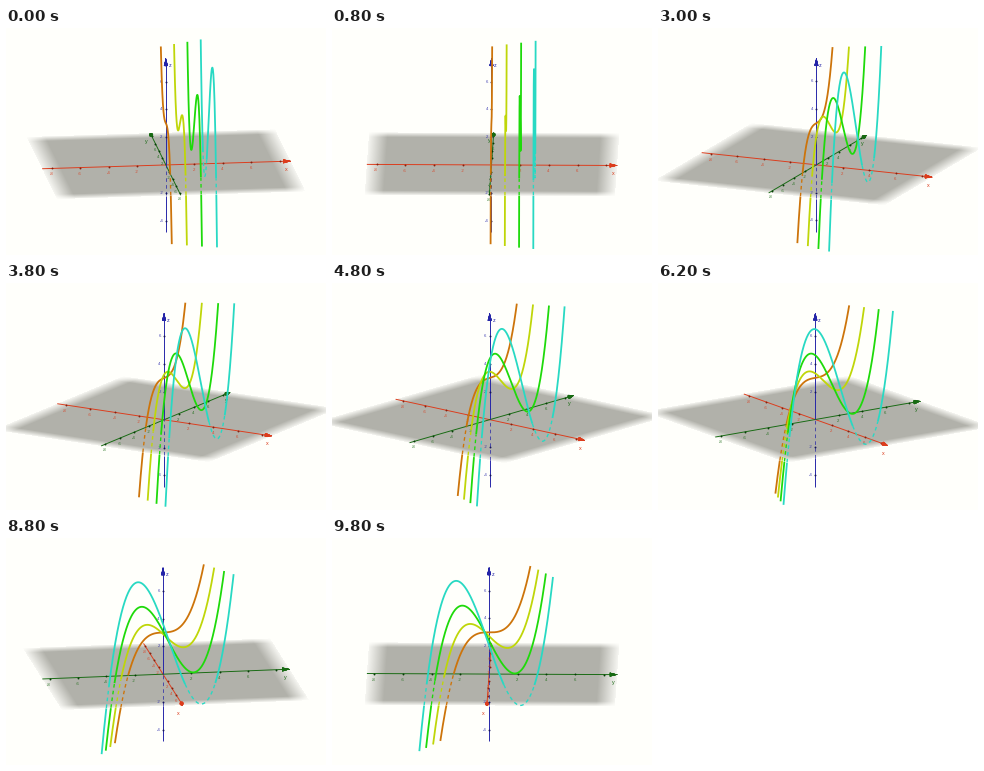
Write a matplotlib script that moves like this. It is 320x227 px and loops after 10000 ms.

```python
import numpy as np
import matplotlib.pyplot as plt
from matplotlib.animation import FuncAnimation
from matplotlib.collections import PolyCollection

W, H, DPI = 320, 227, 100
PX = 72 / DPI                      # points per pixel
FRAMES, STEP = 50, 200

UNIT = 14.35                       # pixels per unit
ELEV = np.arcsin(0.25)
SIN_E, COS_E = np.sin(ELEV), np.cos(ELEV)
MID = np.array([0.035, 0.205])     # pivot of the turn, in model units
HALF = 8.72                        # half side of the floor
Z_LOW, Z_HIGH = -4.83, 7.8
Z_TIP = 7.65

PAPER = "#fffffb"
RED, GREEN, BLUE = "#dc3c1c", "#176a12", "#2424a8"
DARK = ["#84200e", "#063c06", "#14145c"]
HUES = ["#cd740a", "#bfd608", "#1eda0a", "#28d9c3"]


def project(x, y, z, a):
    x, y = x - MID[0], y - MID[1]
    sx = 160 + UNIT * (x * np.cos(a) + y * np.sin(a))
    sy = 136.2 + UNIT * (SIN_E * (x * np.sin(a) - y * np.cos(a)) - COS_E * z)
    return sx, sy


def behind_floor(x, y, z, a):
    k = z * COS_E / SIN_E
    fx = x - k * np.sin(a) - MID[0]
    fy = y + k * np.cos(a) - MID[1]
    return (z < 0) & (np.abs(fx) < HALF) & (np.abs(fy) < HALF)


def cubic(a):
    y = np.linspace(-5.5, 5.5, 3001)
    z = 0.2 * y**3 - a * y + 3
    keep = (z >= Z_LOW) & (z <= Z_HIGH)
    return np.full(keep.sum(), float(a)), y[keep], z[keep]


def along(axis, t):
    p = [np.zeros_like(t), np.zeros_like(t), np.zeros_like(t)]
    p[axis] = t
    return p


def cone(axis, tip):
    t = np.linspace(0, 2 * np.pi, 17)
    base = along(axis, np.full_like(t, tip - 0.5))
    u, v = [i for i in range(3) if i != axis]
    base[u] = 0.13 * np.cos(t)
    base[v] = 0.13 * np.sin(t)
    return base, along(axis, np.array([tip]))


fig = plt.figure(figsize=(W / DPI, H / DPI), dpi=DPI, facecolor=PAPER)
ax = fig.add_axes([0, 0, 1, 1])
ax.set_xlim(0, W)
ax.set_ylim(H, 0)
ax.axis("off")

# floor
cols, rows = np.meshgrid(np.arange(W) + 0.5, np.arange(H) + 0.5)
floor_rgba = np.zeros((H, W, 4))
floor_rgba[..., :3] = np.array([177, 177, 170]) / 255
floor = ax.imshow(floor_rgba, extent=(0, W, H, 0), aspect="auto",
                  interpolation="nearest", zorder=1)


def fade(d):
    edge = np.clip((1 - np.abs(d) / HALF) / 0.15, 0, 1)
    return np.where(np.abs(d) < HALF, 0.12 + 0.88 * edge, 0)


def floor_alpha(a):
    u = (cols - 160) / UNIT
    v = (rows - 136.2) / (UNIT * SIN_E)
    x = u * np.cos(a) + v * np.sin(a)
    y = u * np.sin(a) - v * np.cos(a)
    return fade(x) * fade(y)


def line_pair(color, width, z):
    thin = width * 0.75
    solid, = ax.plot([], [], color=color, lw=width * PX, zorder=z,
                     solid_capstyle="butt")
    dashed, = ax.plot([], [], color=color, lw=thin * PX, zorder=z,
                      dash_capstyle="butt")
    dashed.set_dashes([3.6 / thin, 3.2 / thin])
    return solid, dashed


def set_pair(pair, pts, a):
    sx, sy = project(*pts, a)
    hid = behind_floor(*pts, a)
    pair[0].set_data(np.where(hid, np.nan, sx), sy)
    pair[1].set_data(np.where(hid, sx, np.nan), sy)


class Axis:
    def __init__(self, i, name, color, low, high, ticks, shift):
        self.pts = along(i, np.linspace(low, high - 0.3, 300))
        self.pair = line_pair(color, 0.95, 3)
        self.ticks = along(i, np.array(ticks, float))
        self.dots, = ax.plot([], [], "o", color=DARK[i], ms=1.9 * PX, mew=0,
                             zorder=4)
        self.base, self.tip = cone(i, high)
        self.head = PolyCollection([], facecolor=color, edgecolor=color,
                                   lw=0.2, zorder=4)
        ax.add_collection(self.head)
        self.shift = shift
        self.name_shift = (4, 7) if i == 2 else (-4, 8)
        style = dict(color=color, ha="center", va="center", zorder=4,
                     family="Liberation Sans")
        # the name takes the place of the outermost number
        self.labels = [ax.text(0, 0, "" if t == 8 else str(t),
                               fontsize=4.2 * PX, alpha=0.85, **style)
                       for t in ticks]
        self.name = ax.text(0, 0, name, fontsize=5.4 * PX, **style)

    def draw(self, a):
        set_pair(self.pair, self.pts, a)
        sx, sy = project(*self.ticks, a)
        self.dots.set_data(sx, sy)
        for label, x, y in zip(self.labels, sx, sy):
            label.set_position((x + self.shift[0], y + self.shift[1]))
        ring = np.column_stack(project(*self.base, a))
        tip = np.column_stack(project(*self.tip, a))[0]
        sides = [np.array([tip, p, q]) for p, q in zip(ring, ring[1:])]
        self.head.set_verts(sides + [ring])
        self.name.set_position(tip + self.name_shift)


even = [-8, -6, -4, -2, 2, 4, 6, 8]
axes = [
    Axis(0, "x", RED, MID[0] - HALF, MID[0] + HALF, even, (-0.5, 6)),
    Axis(1, "y", GREEN, MID[1] - HALF, MID[1] + HALF, even, (-0.5, 6)),
    Axis(2, "z", BLUE, Z_LOW, Z_TIP, [-4, -2, 2, 4, 6], (-4.5, 0)),
]
curves = [(line_pair(hue, 1.8, 5 + i), cubic(i)) for i, hue in enumerate(HUES)]


def update(n):
    a = np.radians(2 * n - 7)
    floor_rgba[..., 3] = floor_alpha(a)
    floor.set_data(floor_rgba)
    for axis in axes:
        axis.draw(a)
    for pair, pts in curves:
        set_pair(pair, pts, a)
    return []


anim = FuncAnimation(fig, update, frames=FRAMES, interval=STEP,
                     init_func=lambda: update(0), repeat=True,
                     repeat_delay=0, blit=False)
plt.show()
```
